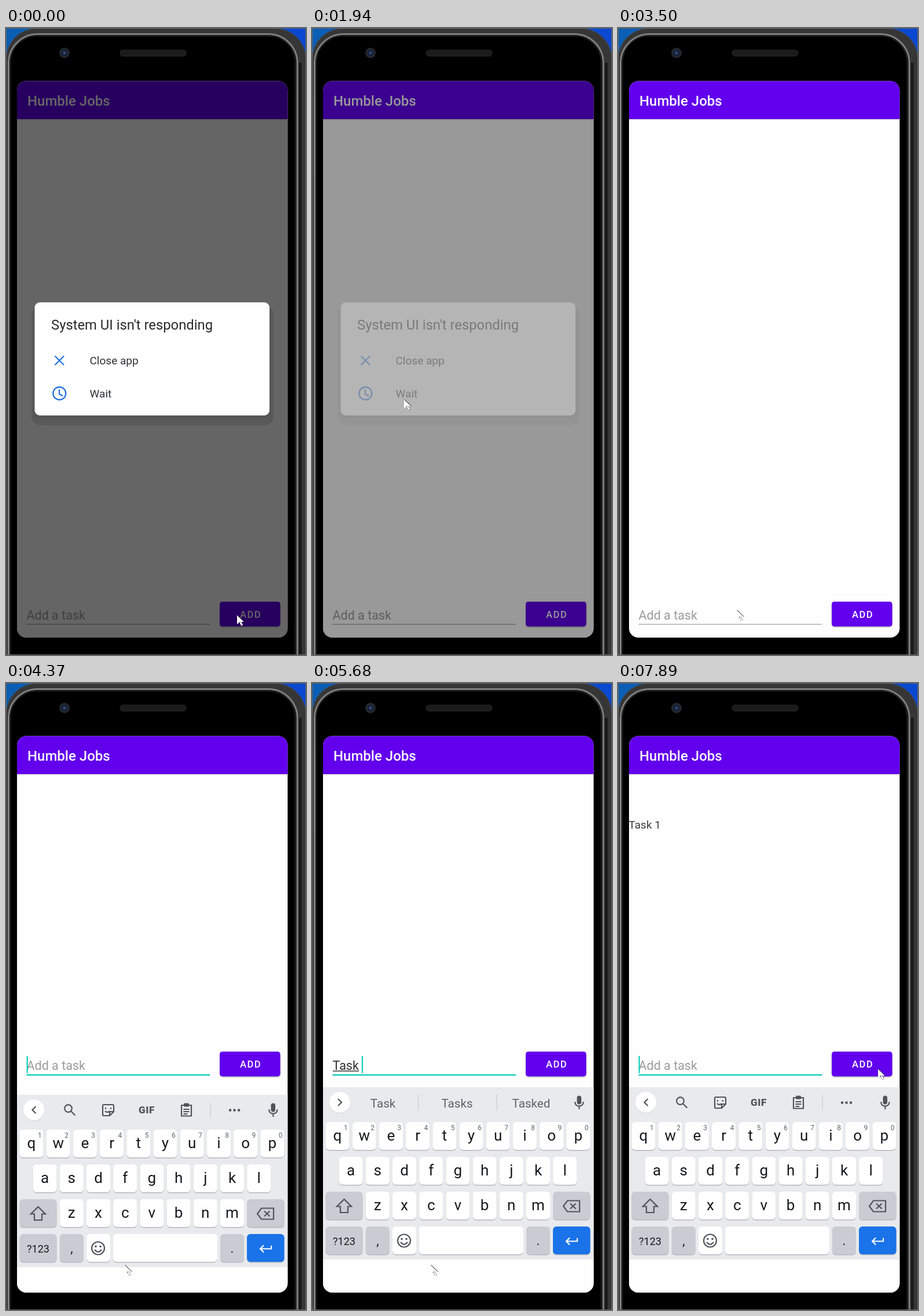
An HTML page that plays this animation: 518 px wide and 1081 px high, repeating every 8 s.

```html
<!DOCTYPE html>
<html lang="en">
<head>
<meta charset="utf-8">
<title>Task list demo</title>
<style>
  html, body { margin: 0; width: 100%; height: 100%; overflow: hidden; background: #000; }
  svg { display: block; width: 100%; height: 100%; }
  text { font-family: Roboto, sans-serif; white-space: pre; }
  .mid { text-anchor: middle; }
  .line { fill: none; stroke: #50545a; stroke-width: 2.2; }
</style>
</head>
<body>
<svg viewBox="0 0 518 1081">
  <defs>
    <linearGradient id="sky"><stop stop-color="#0a5fb4"/><stop offset="1" stop-color="#0a48d0"/></linearGradient>
    <clipPath id="screen"><rect x="19" y="91.5" width="467.3" height="959.5" rx="16"/></clipPath>
    <filter id="soft" x="-10%" y="-20%" width="120%" height="150%"><feGaussianBlur stdDeviation="1.3"/></filter>
  </defs>

  <!-- Phone body -->
  <rect width="518" height="1081" fill="url(#sky)"/>
  <rect x=".5" y="1" width="517" height="1200" rx="52" fill="#363636" stroke="#4a4a4a"/>
  <rect x="4.5" y="10.5" width="498.500" height="1200" rx="50" fill="#000" stroke="#808080" stroke-width="3"/>
  <rect x="7.5" y="13.5" width="492" height="1200" rx="46" fill="#000" stroke="#222" stroke-width="2"/>
  <path d="M508 60V1081" stroke="#1a1a1a" stroke-width="5"/>
  <path d="M.5 1081V.5H517.5V1081M0 1080.5H518" fill="none" stroke="#666"/>
  <circle cx="101" cy="43" r="9" fill="#24272e"/>
  <circle cx="101" cy="43" r="5.5" fill="#15203a"/>
  <circle cx="101" cy="43" r="2.5" fill="#344a70"/>
  <rect x="197" y="38" width="114" height="10.5" rx="5" fill="#1b1b1b" stroke="#282828"/>

  <g clip-path="url(#screen)">
    <rect x="19" y="91" width="468" height="960" fill="#fefefe"/>
    <rect x="19" y="157" width="468" height="1.5" fill="#d4d4d4"/>
    <rect x="19" y="91" width="468" height="66" fill="#6200ee"/>
    <text x="37" y="133.5" font-size="24" font-weight="500" fill="#fff">Humble Jobs</text>
    <text id="item" x="18.5" y="250.5" font-size="19" fill="#3a3a3a">Task 1</text>

    <g id="form">
      <text id="entry" x="35.5" y="1020" font-size="21.5"></text>
      <path id="composing" d="M36 1022.5H81" stroke="#333" stroke-width="1.3"/>
      <path id="underline"/>
      <rect id="caret" y="996.5" width="2.3" height="29.5" fill="#18cfbd"/>
      <rect id="shadow" x="369.5" y="991" width="104" height="42" rx="5" fill="#000" opacity=".35" filter="url(#soft)"/>
      <rect x="369" y="989" width="104.5" height="42.8" rx="4.5" fill="#6200ee"/>
      <rect id="press" x="369" y="989" width="104.5" height="42.8" rx="4.5" fill="#fff"/>
      <text x="422.5" y="1016.5" class="mid" font-size="16.6" font-weight="500" letter-spacing="1.5" fill="#fff">ADD</text>
    </g>

    <g id="keyboard">
      <rect x="19" y="697" width="468" height="297" fill="#e8eaed"/>
      <rect x="19" y="994" width="468" height="360" fill="#fefefe"/>
      <circle cx="48" cy="724" r="18" fill="#000" opacity=".12"/>
      <circle cx="48" cy="723" r="18" fill="#fff"/>
      <path id="chevron" class="line"/>
      <g id="tools">
        <circle class="line" cx="107.5" cy="720.5" r="6.3"/>
        <path class="line" d="M112 725L119.5 732.5"/>
        <path class="line" d="M169 714H184Q186 714 186 716V726L179 733H169Q167 733 167 731V716Q167 714 169 714M186 726H179V733M171 725Q175 729 179 725M172 719V721.5M181 719V721.5"/>
        <text x="243" y="729" class="mid" font-size="17" font-weight="900" letter-spacing=".6" fill="#50545a">GIF</text>
        <path class="line" d="M303 715H320V733.5H303ZM306.5 722H316.5M306.5 726H316.5M306.5 730H313"/>
        <rect x="307" y="711.5" width="9" height="6" rx="1.5" fill="#50545a"/>
        <path d="M353 711V736" stroke="#ccced2" stroke-width="1.3"/>
        <path d="M387 723.5h.01m7.5 0h.01m7.5 0h.01" stroke="#50545a" stroke-width="4.6" stroke-linecap="round"/>
      </g>
      <g id="words" font-size="20.6" fill="#5f6368" class="mid">
        <text x="122.5" y="732"></text><text x="250.5" y="732"></text><text x="378.5" y="732"></text>
        <path d="M183.5 709V738M319 709V738" stroke="#ccced2" stroke-width="1.3"/>
      </g>
      <rect x="457.5" y="711.5" width="7.5" height="15" rx="3.7" fill="#50545a"/>
      <path class="line" d="M454 722Q454.5 729.5 461.3 729.5T468.5 722M461.3 729.5V735"/>
      <g id="keys"></g>
      <path class="line" d="M55.5 890L68 902.5H62V913H49V902.5H43Z"/>
      <path class="line" d="M441 892.5H462V911.5H441L434 902ZM446 897.5L455.5 906.5M455.5 897.5L446 906.5"/>
      <circle class="line" cx="159" cy="961.5" r="11"/>
      <path class="line" d="M153 964Q159 971.5 165 964"/>
      <path d="M155 958.5h.01m8 0h.01" stroke="#50545a" stroke-width="3.6" stroke-linecap="round"/>
      <path d="M458 957V962.5H439.5M445 956.5L439 962.5L445 968.5" fill="none" stroke="#fff" stroke-width="2.2"/>
    </g>

    <rect id="dim" x="19" y="91" width="468" height="960"/>
    <g id="dialog">
      <rect x="44" y="479" width="418" height="206" rx="16" fill="#000" opacity=".12"/>
      <rect x="48" y="474" width="409" height="198" rx="10" fill="#000" opacity=".06"/>
      <rect x="49.5" y="473" width="405.5" height="195" rx="9" fill="#fff"/>
      <path id="ripple" d="M49.5 601.5H433Q437 630 433 658.5H49.5Z" fill="#e3e3e3"/>
      <text x="78" y="520" font-size="23.8" fill="#2a2a2a">System UI isn't responding</text>
      <g font-size="19" fill="#303134"><text x="144.5" y="580">Close app</text><text x="144.5" y="637">Wait</text></g>
      <path d="M84.5 565.5L100 581M100 565.5L84.5 581M92 623V631L98 634.5" fill="none" stroke="#2473e0" stroke-width="2.2"/>
      <circle cx="92.3" cy="630" r="11" fill="none" stroke="#2473e0" stroke-width="2.3"/>
    </g>
  </g>

  <g id="pointer">
    <path d="M0 0V16L4 12.5L7 19L10 17.5L7.5 12H12Z" fill="#fff"/>
    <path d="M.5 .5L12.5 12" stroke="#111"/>
    <path d="M4 12.5L7.5 18.5L10.5 17.5L8 12.5Z" fill="none" stroke="#333" stroke-dasharray="1.5 1.5"/>
  </g>
</svg>

<script>
const $ = id => document.getElementById(id);
const show = (id, on) => { $(id).style.display = on ? '' : 'none'; };
const set = (id, attrs) => { for (const name in attrs) $(id).setAttribute(name, attrs[name]); };

// Keyboard layout
const GREY = '#c9ccd2', PITCH = 46.2;
function key(x, y, width, label = '', fill = '#fff', size = 26) {
  return `<rect x="${x}" y="${y + 1.5}" width="${width}" height="48" rx="6" fill="#b5b8bd"/>
    <rect x="${x}" y="${y}" width="${width}" height="48" rx="6" fill="${fill}"/>
    <text x="${x + width / 2}" y="${y + 32}" class="mid" font-size="${size}" fill="#17181a">${label}</text>`;
}
function row(letters, x, y) {
  return [...letters].map((letter, i) => key(x + i * PITCH, y, 41, letter)).join('');
}
const digits = [...'1234567890'].map((digit, i) =>
  `<text x="${58.3 + i * PITCH}" y="770.5" class="mid" font-size="12" fill="#5f6368">${digit}</text>`).join('');
$('keys').innerHTML = row('qwertyuiop', 23.5, 757) + digits +
  row('asdfghjkl', 46.6, 817) + row('zxcvbnm', 92.8, 877) +
  key(23.5, 877, 64, '', GREY) + key(416, 877, 64.5, '', GREY) +
  key(23.5, 937, 64, '?123', GREY, 18) + key(92.8, 937, 41, ',', GREY, 22) +
  key(139, 937, 41) + key(184.5, 937, 180.5) +
  key(370, 937, 41, '.', GREY, 22) + key(416, 937, 64.5, '', '#1a73e8');

// Step tracks: each entry holds from its start time until the next one.
const LOOP = 8000;
const POINTER = [
  [0, 399, 1012], [130, 375, 1040], [250, 341, 1068], [370, -50, -50],
  [830, 247, 1040], [950, 126, 684], [1070, 136, 659], [1350, 150, 648], [1500, 159, 640],
  [2770, 458, 600], [2920, 390, 850], [3070, 254, 1003], [3350, 225, 1003], [3500, 205, 1003],
  [6530, 290, 950], [6670, 380, 850], [6820, 450, 740], [6970, 475, 695], [7110, 460, 674], [7260, 449, 665]
];
const SLIDE = [[0, 400], [4100, 220], [4240, 65], [4370, 13], [4490, 0]];
const TYPED = [[0, ''], [4770, 'T'], [4920, 'Ta'], [5070, 'Tas'], [5220, 'Task'], [5530, 'Task '], [6230, 'Task 1'], [7780, '']];
const WORDS = [[0, 'T', 'The', 'This'], [4920, 'Take', 'Talk', 'Tag'], [5070, 'Task', 'Tasks', 'Tasked'], [5950, 'force', 'is', 'and']];
const CARET_X = { '': 35.5, T: 48, Ta: 59, Tas: 70, Task: 80.5, 'Task ': 85.8, 'Task 1': 97.5 };
const at = (track, t) => track.findLast(step => step[0] <= t).slice(1);

function render(t) {
  const focused = t >= 3800, raised = t >= 4100;
  const suggesting = t >= 4770 && t < 6230;
  const [text] = at(TYPED, t);

  set('pointer', { transform: `translate(${at(POINTER, t)})` });
  set('keyboard', { transform: `translate(0 ${at(SLIDE, t)})` });
  show('keyboard', raised);
  set('form', { transform: `translate(0 ${raised ? -353.5 : 0})` });

  $('entry').textContent = text || 'Add a task';
  set('entry', { fill: text ? '#303030' : '#9b9b9b' });
  show('composing', text.startsWith('Task') && t < 5950);
  set('underline', focused
    ? { d: 'M35.5 1029.3H352', stroke: '#18cfbd', 'stroke-width': 2.4 }
    : { d: 'M35.5 1028.2H352', stroke: '#a0a0a0', 'stroke-width': 1.3 });
  set('caret', { x: CARET_X[text] });
  show('caret', focused && !(t >= 6880 && t < 7380));

  show('tools', !suggesting);
  show('words', suggesting);
  set('chevron', { d: suggesting ? 'M45 717L51 723L45 729' : 'M51.5 717L45.5 723L51.5 729' });
  const words = at(WORDS, t);
  $('words').querySelectorAll('text').forEach((node, i) => { node.textContent = words[i]; });

  set('press', { opacity: t < 7650 ? 0 : t < 7780 ? .2 : t < 7890 ? .1 : 0 });
  set('shadow', { y: t >= 7650 && t < 7890 ? 995 : 991 });
  show('item', t >= 7780);

  set('dim', { opacity: t < 1940 ? .6 : t < 2060 ? .4 : 0 });
  set('dialog', { opacity: t < 1940 ? 1 : t < 2060 ? .28 : 0 });
  show('ripple', t >= 1790 && t < 1940);
}

const start = performance.now();
function tick() {
  render((performance.now() - start) % LOOP);
  requestAnimationFrame(tick);
}
tick();
</script>
</body>
</html>
```
